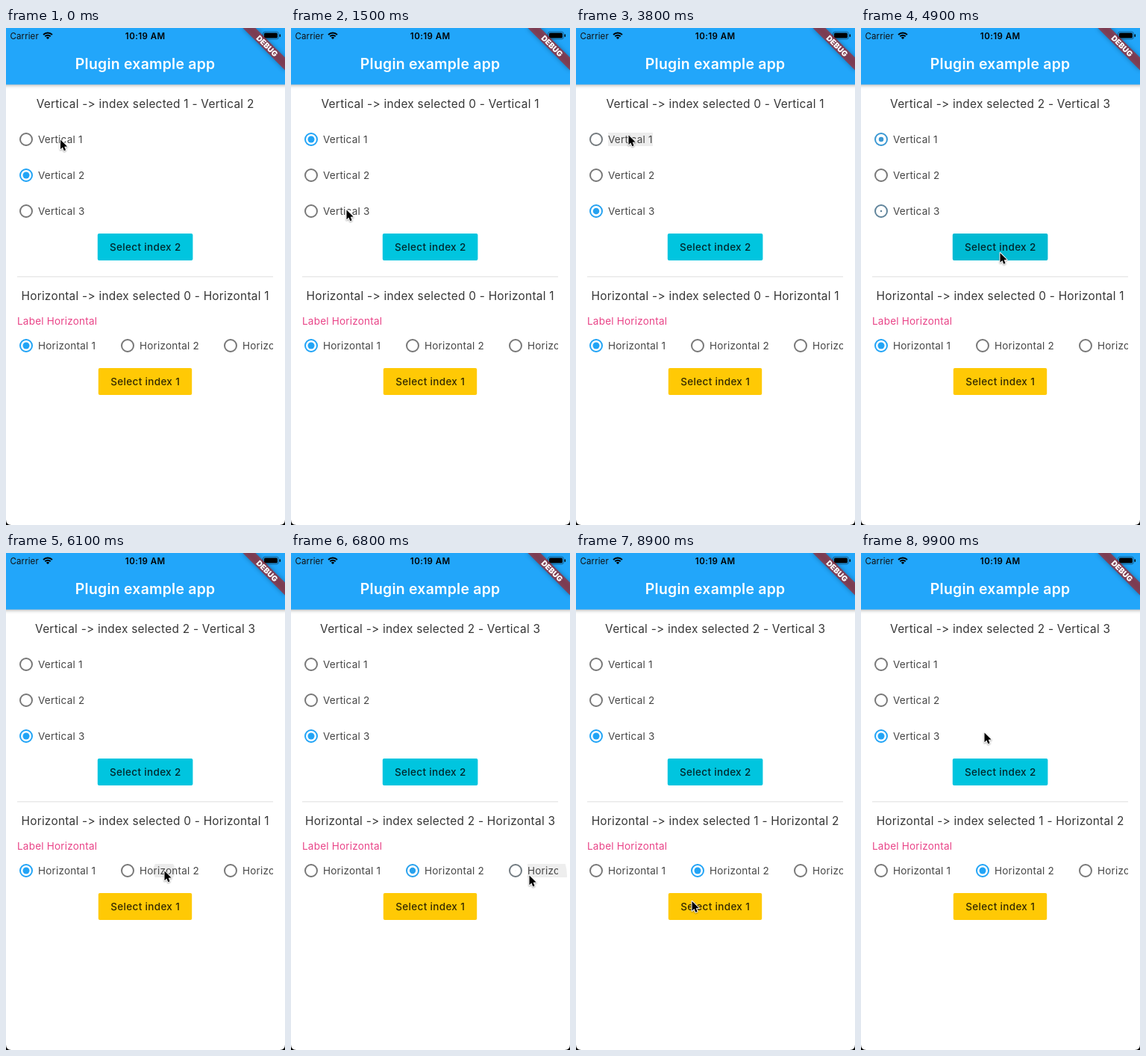
These frames come from a looping animation (374 px wide and 665 px high, 10000 ms). An HTML page with a canvas:

```html
<!DOCTYPE html>
<html lang="en">
<head>
<meta charset="utf-8">
<title>Plugin example app</title>
<style>
html, body { margin: 0; width: 100%; height: 100%; overflow: hidden; background: #fff; }
canvas { display: block; width: 374px; height: 665px; }
</style>
</head>
<body>
<canvas id="stage"></canvas>
<script>
const W = 374, H = 665, LOOP = 10000, STEP = 100;
const BLUE = '#22a6fa', INK = '#363636', SOFT = '#464646';
const FONT = 'Inter, Roboto, sans-serif';
const canvas = document.getElementById('stage');
const ctx = canvas.getContext('2d');
const dpr = window.devicePixelRatio || 1;
canvas.width = W * dpr;
canvas.height = H * dpr;

const ROWS = [149, 197, 245], COLS = [27, 163, 301], COL_Y = 425;
const BUTTONS = {
  v: { x: 122.8, y: 275, w: 127.6, h: 36, color: '#00c5df', label: 'Select index 2' },
  h: { x: 123.8, y: 455, w: 125.4, h: 36, color: '#ffc905', label: 'Select index 1' }
};
const FIRST = { v: 1, h: 0 };

// Each tap picks an index in its group, by label or by button.
const TAPS = [
  { group: 'v', pick: 0, down: 750, up: 860 },
  { group: 'v', pick: 2, down: 1610, up: 1720 },
  { group: 'v', pick: 2, down: 2535, up: 2650, button: true },
  { group: 'v', pick: 0, down: 3660, up: 3790 },
  { group: 'v', pick: 2, down: 4735, up: 4845, button: true },
  { group: 'h', pick: 1, down: 6050, up: 6150 },
  { group: 'h', pick: 2, down: 6670, up: 6785 },
  { group: 'h', pick: 0, down: 7840, up: 7940 },
  { group: 'h', pick: 1, down: 8390, up: 8490, button: true }
];

// Pointer stops: time, x, y
const PATH = [
  [0, 72.5, 149], [200, 70, 148], [900, 70, 148], [1500, 74, 243], [1750, 74, 243],
  [2400, 170, 291], [2750, 170, 291], [3500, 70, 143], [3900, 70, 143],
  [4600, 186, 300.5], [5100, 186, 300.5], [5900, 212, 425], [6250, 212, 425],
  [6600, 319, 431], [6850, 319, 431], [7700, 56, 429], [7950, 56, 429],
  [8200, 155, 467], [8850, 155, 467], [9900, 165, 240], [LOOP, 165, 240]
];

const clamp = v => Math.max(0, Math.min(1, v));
const smooth = v => v * v * (3 - 2 * v);
const mix = (a, b, p) => a + (b - a) * p;

function pointer(t) {
  const i = Math.max(1, PATH.findIndex(k => k[0] > t));
  const [t0, x0, y0] = PATH[i - 1], [t1, x1, y1] = PATH[i];
  const p = smooth(clamp((t - t0) / (t1 - t0)));
  return [mix(x0, x1, p), mix(y0, y1, p)];
}

function selection(group, t) {
  let now = FIRST[group], before = now, since = -LOOP;
  for (const tap of TAPS) {
    if (tap.group === group && tap.up <= t && tap.pick !== now) {
      before = now;
      now = tap.pick;
      since = tap.up;
    }
  }
  const p = clamp((t - since) / 200);
  return { now, level: i => i === now ? p : i === before ? 1 - p : 0 };
}

// Runs are split inside "->" so that the font does not join it into an arrow.
function text(str, x, y, { size, weight = 400, color = INK, gap = 0, center = false }) {
  ctx.font = `${weight} ${size}px ${FONT}`;
  ctx.letterSpacing = gap + 'px';
  ctx.fillStyle = color;
  ctx.textAlign = 'left';
  ctx.textBaseline = 'alphabetic';
  const runs = str.split(/(?<=-)(?=>)/);
  const widths = runs.map(r => ctx.measureText(r).width);
  if (center) x -= (widths.reduce((a, b) => a + b) - gap) / 2;
  runs.forEach((r, i) => {
    ctx.fillText(r, x, y);
    x += widths[i];
  });
}

function box(x, y, w, h, r) {
  ctx.beginPath();
  ctx.roundRect(x, y, w, h, r);
}

function disc(x, y, r) {
  ctx.beginPath();
  ctx.arc(x, y, r, 0, Math.PI * 2);
  ctx.fill();
}

function radio(x, y, level) {
  const color = `rgb(${mix(120, 34, level)},${mix(120, 164, level)},${mix(120, 246, level)})`;
  ctx.strokeStyle = ctx.fillStyle = color;
  ctx.lineWidth = 2;
  ctx.beginPath();
  ctx.arc(x, y, 8, 0, Math.PI * 2);
  ctx.stroke();
  if (level > 0) disc(x, y, 4.5 * level);
}

function target(tap) {
  if (tap.button) return BUTTONS[tap.group];
  return tap.group === 'v'
    ? { x: 43, y: ROWS[tap.pick] - 9, w: 60, h: 18 }
    : { x: COLS[tap.pick] + 16, y: COL_Y - 9, w: 78, h: 18 };
}

function ripples(t) {
  for (const tap of TAPS) {
    if (t < tap.down || t > tap.up + 200) continue;
    const { x, y, w, h } = target(tap);
    const [cx, cy] = pointer(tap.down);
    const fade = (1 - clamp((t - tap.up) / 200)) ** 2;
    const radius = 0.3 * (t - tap.down) + 0.8 * Math.max(0, t - tap.up);
    ctx.save();
    box(x, y, w, h, tap.button ? 2 : 0);
    ctx.clip();
    if (tap.button) {
      ctx.fillStyle = `rgba(0,0,0,${0.015 * fade})`;
      ctx.fillRect(x, y, w, h);
    }
    ctx.fillStyle = `rgba(0,0,0,${(tap.button ? 0.09 : 0.08) * fade})`;
    disc(cx, cy, radius);
    ctx.restore();
  }
}

function wifi(x, y) {
  ctx.strokeStyle = ctx.fillStyle = '#000';
  ctx.lineWidth = 2;
  for (const r of [5.2, 8.4]) {
    ctx.beginPath();
    ctx.arc(x, y, r, -Math.PI * 0.75, -Math.PI * 0.25);
    ctx.stroke();
  }
  ctx.beginPath();
  ctx.moveTo(x, y);
  ctx.arc(x, y, 3, -Math.PI * 0.75, -Math.PI * 0.25);
  ctx.fill();
}

function battery() {
  ctx.strokeStyle = 'rgba(0,0,0,.4)';
  ctx.lineWidth = 1;
  box(344.5, 5, 21, 10, 3);
  ctx.stroke();
  ctx.fillStyle = '#000';
  box(346, 6.5, 18, 7, 1.6);
  ctx.fill();
  box(366.6, 8.3, 1.4, 3.6, 0.7);
  ctx.fill();
}

function banner() {
  ctx.save();
  ctx.translate(W, 0);
  ctx.rotate(Math.PI / 4);
  ctx.shadowColor = 'rgba(0,0,0,.5)';
  ctx.shadowBlur = 6 * dpr;
  ctx.fillStyle = 'rgba(183,28,28,.63)';
  ctx.fillRect(-40, 28, 80, 12);
  ctx.shadowColor = 'transparent';
  text('DEBUG', 0, 37.7, { size: 10.2, weight: 900, color: '#fff', center: true });
  ctx.restore();
}

function appBar() {
  ctx.save();
  ctx.shadowColor = 'rgba(0,0,0,.34)';
  ctx.shadowBlur = 5 * dpr;
  ctx.shadowOffsetY = 1.5 * dpr;
  ctx.fillStyle = BLUE;
  ctx.fillRect(-10, -10, W + 20, 85.6);
  ctx.restore();
  text('Carrier', 5.5, 14.6, { size: 11.5, gap: 0.1, color: '#111' });
  wifi(56, 15);
  text('10:19 AM', 186.5, 14.6, { size: 11.5, weight: 600, gap: 0.45, color: '#000', center: true });
  battery();
  text('Plugin example app', 186.5, 55, { size: 19.4, weight: 600, gap: 0.26, color: '#fff', center: true });
  banner();
}

function heading(name, index, y) {
  text(`${name} -> index selected ${index} - ${name} ${index + 1}`, 186.5, y,
    { size: 15.4, gap: 0.26, center: true });
}

function buttonBase({ x, y, w, h, color }) {
  ctx.fillStyle = color;
  box(x, y, w, h, 2);
  ctx.fill();
}

function arrow(x, y) {
  ctx.save();
  ctx.translate(x, y);
  ctx.beginPath();
  [[0.5, 0.5], [0.5, 13.3], [3.4, 10.6], [5.3, 15.2], [7.6, 14.2], [5.7, 9.8], [9.6, 9.6]]
    .forEach(([px, py]) => ctx.lineTo(px, py));
  ctx.closePath();
  ctx.lineJoin = 'round';
  ctx.lineWidth = 2;
  ctx.strokeStyle = '#fff';
  ctx.shadowColor = 'rgba(0,0,0,.35)';
  ctx.shadowBlur = 2 * dpr;
  ctx.shadowOffsetY = dpr;
  ctx.stroke();
  ctx.shadowColor = 'transparent';
  ctx.fillStyle = '#000';
  ctx.fill();
  ctx.restore();
}

function corners() {
  const r = 7;
  ctx.fillStyle = '#000';
  for (const [x, dir] of [[0, 1], [W, -1]]) {
    ctx.beginPath();
    ctx.moveTo(x, H - r);
    ctx.quadraticCurveTo(x, H, x + dir * r, H);
    ctx.lineTo(x, H);
    ctx.fill();
  }
}

function draw(t) {
  ctx.setTransform(dpr, 0, 0, dpr, 0, 0);
  ctx.fillStyle = '#fff';
  ctx.fillRect(0, 0, W, H);
  const item = { size: 13.5, gap: 0.22, color: SOFT };
  const v = selection('v', t), h = selection('h', t);

  buttonBase(BUTTONS.v);
  buttonBase(BUTTONS.h);
  ripples(t);

  heading('Vertical', v.now, 107);
  ROWS.forEach((y, i) => {
    radio(27, y, v.level(i));
    text(`Vertical ${i + 1}`, 43, y + 4.7, item);
  });

  ctx.fillStyle = '#e9e9e9';
  ctx.fillRect(15, 332, 343, 1.5);

  heading('Horizontal', h.now, 364);
  text('Label Horizontal', 15, 397, { ...item, color: '#e94488' });
  ctx.save();
  ctx.beginPath();
  ctx.rect(15, 405, 343, 40);
  ctx.clip();
  COLS.forEach((x, i) => {
    radio(x, COL_Y, h.level(i));
    text(`Horizontal ${i + 1}`, x + 16, COL_Y + 4.7, item);
  });
  ctx.restore();

  for (const b of Object.values(BUTTONS)) {
    text(b.label, b.x + b.w / 2, b.y + 22.8,
      { size: 13.5, weight: 500, gap: 0.33, color: 'rgba(0,0,0,.8)', center: true });
  }

  appBar();
  corners();
  arrow(...pointer(t));
}

const start = performance.now();
function tick() {
  const t = (performance.now() - start) % LOOP;
  draw(Math.floor(t / STEP) * STEP);
  requestAnimationFrame(tick);
}
tick();
</script>
</body>
</html>
```
